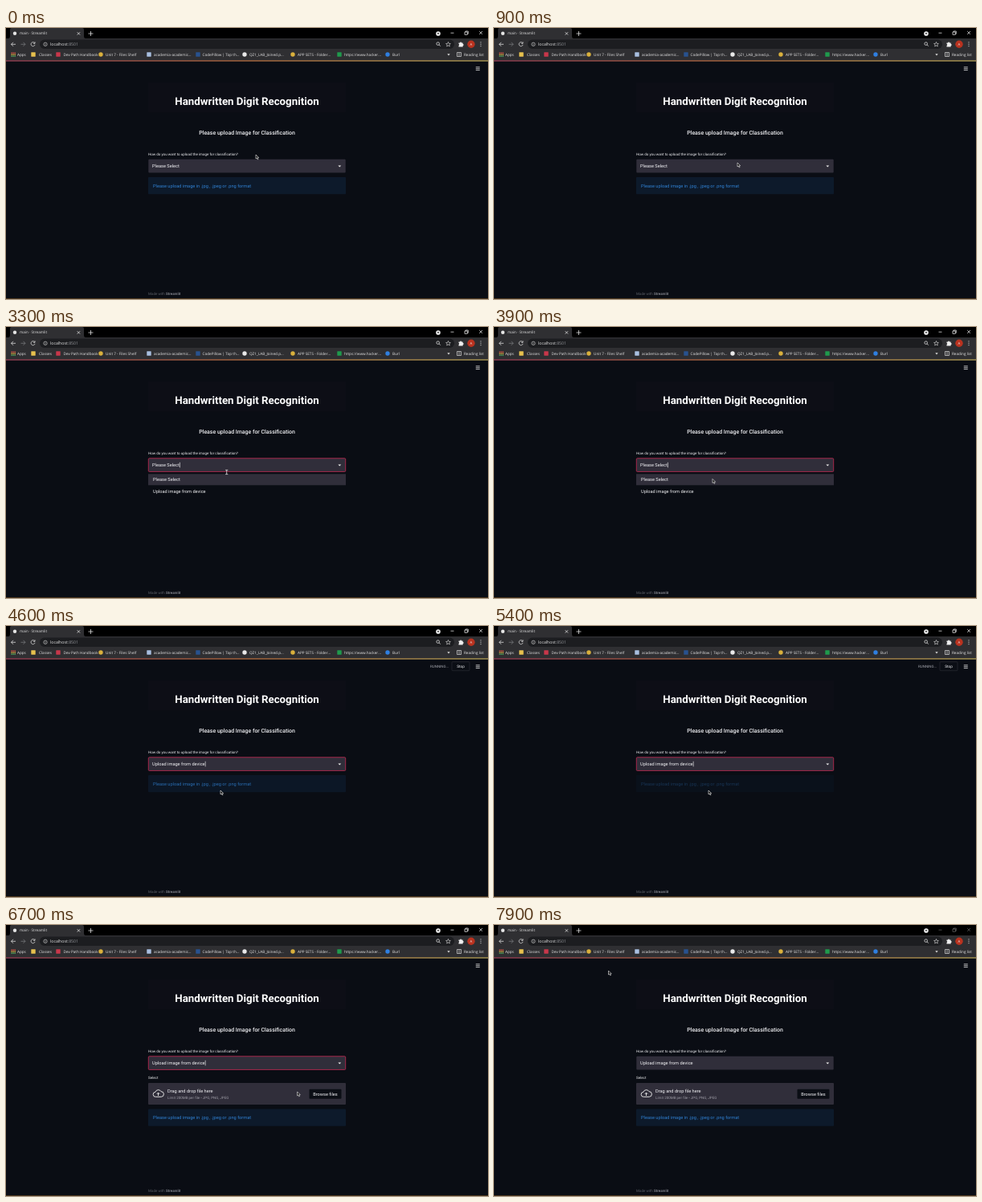
These frames come from a looping animation (600 by 338 pixels, 8000 ms). An HTML page:

```html
<!DOCTYPE html>
<html lang="en">
<head>
<meta charset="utf-8">
<title>Handwritten Digit Recognition</title>
<style>
html, body { margin: 0; width: 100%; height: 100%; overflow: hidden; background: #0a0d14; }
svg { display: block; width: 100vw; height: 100vh; }
text { font: 5.65px Roboto, sans-serif; fill: #f2f2f5; text-rendering: geometricPrecision; }
.chrome text { font: 4.65px "Open Sans", sans-serif; fill: #e6e6e6; }
.line { fill: none; stroke: #ddd; stroke-width: .8; }
.panel { fill: #302e3a; }
</style>
</head>
<body>
<svg viewBox="0 0 600 338">
  <defs>
    <linearGradient id="deco"><stop stop-color="#9c4258"/><stop offset=".5" stop-color="#b87143"/><stop offset="1" stop-color="#b9a65a"/></linearGradient>
  </defs>
  <rect width="600" height="338" fill="#0a0d14"/>

  <g class="chrome">
    <rect width="600" height="13" fill="#000"/>
    <path d="M3 13Q5 13 5 10V2Q5 0 7 0H95Q97 0 97 2V10Q97 13 99 13Z" fill="#2f2f32"/>
    <rect y="13" width="600" height="27.5" fill="#2f2f32"/>
    <rect x="42" y="14.5" width="516" height="11.5" rx="5.7" fill="#1c1d20"/>
    <rect y="40.3" width="600" height="1.3" fill="url(#deco)"/>
    <circle cx="11" cy="6.7" r="2.2" fill="#e4e4e4"/>
    <text x="17" y="8.4">main · Streamlit</text>
    <path class="line" d="M88.7 5.2l3.4 3.4m0-3.4l-3.4 3.4M102.5 7h6m-3-3v6"/>
    <circle cx="538" cy="7" r="2.8" fill="#eee"/>
    <path d="M536.6 6.2h2.8l-1.4 1.9z" fill="#111"/>
    <path id="controls" class="line" d="M553.5 6.2h4M571 5h3.3v3.3h-3.3zM572 5v-1h3.3v3.3h-1M589.2 4l3.8 3.8m0-3.8l-3.8 3.8"/>
    <path class="line" d="M12 20.3H6.5m2.5-2.5l-2.5 2.5 2.5 2.5"/>
    <path class="line" style="stroke:#77787b" d="M18.5 20.3H24m-2.5-2.5l2.5 2.5-2.5 2.5"/>
    <path class="line" d="M35.6 18.7a2.5 2.5 0 1 0 .4 2.2M36 17.3v2h-2"/>
    <circle class="line" cx="49" cy="20.3" r="2.2" style="stroke-width:.6"/>
    <path class="line" d="M49 20v1.4m0-2.6v.6" style="stroke-width:.6"/>
    <text x="55" y="22.2" style="font-size:5.2px">localhost<tspan fill="#94969a">:8501</tspan></text>
    <path class="line" d="M539 20.8l1.8 1.9M539.5 19.6a1.8 1.8 0 1 1-3.6 0a1.8 1.8 0 1 1 3.6 0"/>
    <path class="line" style="stroke-width:.6" d="M550.5 17.4l.8 2 2.1.1-1.6 1.4.5 2.1-1.8-1.1-1.8 1.1.5-2.1-1.6-1.4 2.1-.1z"/>
    <path d="M563.5 18.5h1.6a1 1 0 1 1 2 0h1.6v1.6a1 1 0 1 1 0 2v1.4h-5.2v-1.5a1 1 0 0 0 0-1.9z" fill="#eee"/>
    <circle cx="579" cy="20.2" r="4.7" fill="#b9321f"/>
    <text x="579" y="21.8" text-anchor="middle" style="font-size:4.4px">A</text>
    <path d="M591 17.8v.01M591 20.2v.01M591 22.6v.01" stroke="#ddd" stroke-width="1.2" stroke-linecap="round"/>
    <g id="bookmarks"></g>
    <path d="M549.3 32.2h3.4l-1.7 2.2z" fill="#ddd"/>
    <path class="line" style="stroke-width:.7" d="M561.5 30.5h5v5h-5zM563 32h2m-2 2h2"/>
    <text x="570" y="34.9">Reading list</text>
  </g>

  <path class="line" d="M584.8 48.8h5m-5 1.9h5m-5 1.9h5"/>
  <g id="running">
    <text x="528" y="52.4" style="font-size:4.5px;fill:#a4a6ad">RUNNING...</text>
    <rect x="555" y="44.7" width="22" height="11" rx="1" fill="#0b0e15" stroke="#30323a" stroke-width=".6"/>
    <text x="566" y="52" text-anchor="middle" style="font-size:4.7px">Stop</text>
  </g>

  <rect x="177" y="68" width="246" height="37" fill="#0d0e16"/>
  <text x="300" y="96" text-anchor="middle" style="font-size:13.3px;font-weight:700;fill:#fff">Handwritten Digit Recognition</text>
  <text x="300" y="132.8" text-anchor="middle" style="font-size:6.95px;font-weight:500">Please upload Image for Classification</text>
  <text x="177" y="158.6" style="font-size:4.5px">How do you want to upload the image for classification?</text>

  <rect id="select" class="panel" x="177.3" y="163.8" width="245.4" height="16.6" rx="1" stroke-width=".9"/>
  <text id="choice" x="182" y="174.1"></text>
  <path id="caret" stroke="#fff" stroke-width=".6"/>
  <path d="M413.4 171.4h3.8l-1.9 2z" fill="#eee"/>

  <g id="uploader">
    <text x="177" y="192.4" style="font-size:4.5px">Select</text>
    <rect class="panel" x="177" y="197" width="246" height="27" rx="1"/>
    <path class="line" style="stroke-width:1" d="M186.3 214.3a3 3 0 0 1-.3-6a3.8 3.8 0 0 1 7-.6a3.3 3.3 0 0 1 .2 6.6zM189.5 213v-3.8m-1.7 1.6l1.7-1.7 1.7 1.7"/>
    <text x="201" y="209.1">Drag and drop file here</text>
    <text x="201" y="217.4" style="font-size:4.5px;fill:#9c9ba4">Limit 200MB per file • JPG, PNG, JPEG</text>
    <rect x="377.5" y="204.8" width="40" height="12" rx="1" fill="#0b0e15"/>
    <text x="397.5" y="212.7" text-anchor="middle">Browse files</text>
  </g>

  <g id="info">
    <rect x="177" y="186" width="246" height="21.3" rx="1" fill="#0d1a2b"/>
    <text x="183" y="198.6" style="fill:#3080d2">Please upload image in .jpg , .jpeg or .png format</text>
  </g>

  <g id="menu">
    <rect x="177" y="182" width="246" height="32" fill="#0a0d14"/>
    <rect id="hover" class="panel" x="177" width="246" height="14"/>
    <text x="183" y="192.2">Please Select</text>
    <text x="183" y="206.6">Upload image from device</text>
  </g>

  <text x="177" y="333.4" style="font-size:4.5px;fill:#5b5e66">Made with <tspan fill="#90929a" font-weight="500">Streamlit</tspan></text>
  <rect y="337.2" width="600" height=".8" fill="#5a3f1e"/>

  <path id="arrow" d="M0 0V5L1.2 4 2.1 5.9 3 5.5 2.2 3.7H3.7Z" fill="#111" stroke="#eee" stroke-width=".6"/>
  <path id="beam" class="line" d="M-1.6-2.6h3.2M0-2.6v5.2M-1.6 2.6h3.2"/>
</svg>

<script>
const $ = id => document.getElementById(id);
const LOOP = 8000, STEP = 100;

// icon centre, label start, label, icon colour, round icon
const bookmarks = [
  [34, 41, 'Classes', '#e6c04d', 0],
  [65, 71.5, 'Dev Path Handbook', '#c8374a', 0],
  [118, 124, 'Unit 7 - Files Shelf', '#d9b03c', 1],
  [178, 184, 'academia-academic...', '#a9bfe0', 0],
  [239, 244.5, 'CodePillow | Top th...', '#28528f', 0],
  [297, 303, 'QZ1_LAB_Joined.p...', '#e8e8e8', 1],
  [357, 363, 'APP SETS - Folder...', '#d9b03c', 1],
  [415, 421, 'https://www.hacker...', '#1f9a4c', 0],
  [475, 481, 'Burl', '#2f7fe0', 1]
];
const dots = ['#e05a4a', '#e0b040', '#58b060'].flatMap((color, row) =>
  [0, 1, 2].map(col => `<rect x="${6.5 + col * 2}" y="${30.5 + row * 2}" width="1.4" height="1.4" fill="${color}"/>`));
$('bookmarks').innerHTML = dots.join('') + '<text x="14" y="34.9">Apps</text>' +
  bookmarks.map(([cx, x, label, color, round]) =>
    `<rect x="${cx - 2.7}" y="30.3" width="5.4" height="5.4" rx="${round ? 2.7 : .4}" fill="${color}"/>
     <text x="${x}" y="34.9">${label}</text>`).join('');

// time, x, y of the pointer tip
const path = [
  [0, 311, 158], [900, 303, 168], [2400, 271, 181], [2900, 274.7, 181], [3700, 274.7, 181],
  [4200, 267, 205], [6300, 267, 205], [6900, 396, 209], [7200, 396, 209], [7900, 142.5, 57]
];

const ramp = (t, from, to) => Math.min(1, Math.max(0, (t - from) / (to - from)));
const show = (id, opacity) => $(id).setAttribute('opacity', +opacity);

function pointer(t) {
  const i = path.findIndex(p => p[0] > t);
  if (i < 0) return path.at(-1).slice(1);
  const [a, b] = [path[i - 1], path[i]];
  const k = ramp(t, a[0], b[0]), e = k * k * (3 - 2 * k);
  return [a[1] + (b[1] - a[1]) * e, a[2] + (b[2] - a[2]) * e];
}

function draw(t) {
  const [x, y] = pointer(t);
  const open = t >= 2900 && t < 4300;
  const chosen = t >= 4300;
  const uploaded = t >= 5500;
  const focused = t >= 2900 && t < 7200;
  const beam = t >= 2900 && t < 3800;

  $('choice').textContent = chosen ? 'Upload image from device' : 'Please Select';
  $('select').setAttribute('stroke', focused ? '#b5294f' : 'none');
  const end = 182.6 + $('choice').getComputedTextLength();
  $('caret').setAttribute('d', `M${end} 168.8v6.6`);
  const blinkStart = chosen ? 4300 : 2900;
  show('caret', focused && (t - blinkStart) % 1000 < 500);

  show('menu', open);
  $('hover').setAttribute('y', y > 196 ? 197.7 : 183.3);
  show('uploader', uploaded);
  show('running', t >= 4400 ? 1 - ramp(t, 5600, 6400) * .9 - (t >= 6400) * .1 : 0);
  $('info').setAttribute('transform', `translate(0 ${uploaded ? 43.5 : 0})`);
  show('info', uploaded ? .06 + .94 * ramp(t, 5900, 6300) : 1 - .67 * ramp(t, 4300, 5400));
  show('controls', t >= 7200 ? .4 : 1);

  show('arrow', !beam);
  show('beam', beam);
  for (const id of ['arrow', 'beam']) $(id).setAttribute('transform', `translate(${x} ${y})`);
}

const start = performance.now();
function tick() {
  const t = (performance.now() - start) % LOOP;
  draw(Math.floor(t / STEP) * STEP);
  requestAnimationFrame(tick);
}
tick();
</script>
</body>
</html>
```
